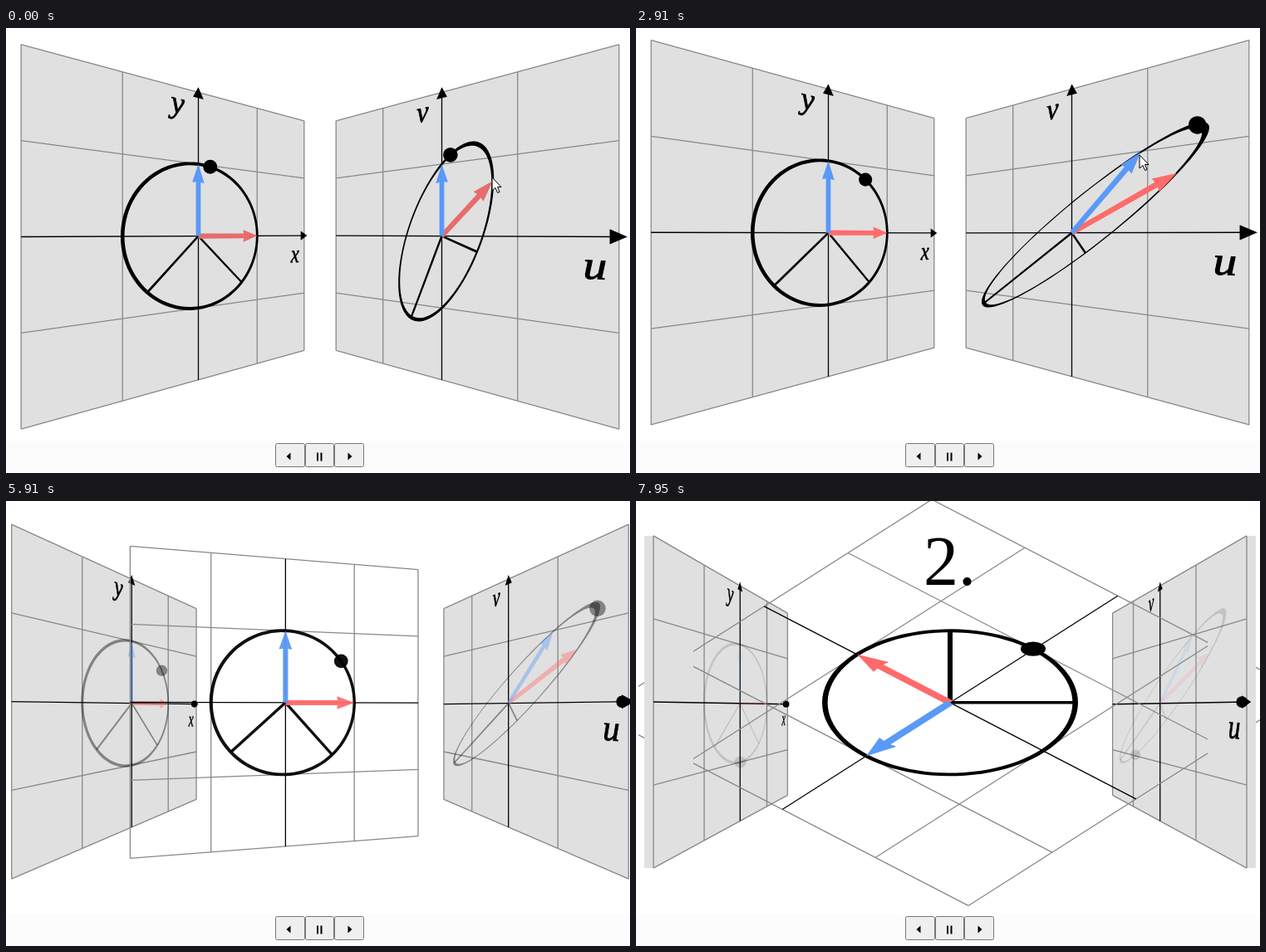
Animation, 751 px wide and 536 px high, one loop 8000 ms. Source, as an HTML page with a canvas:

```html
<!DOCTYPE html>
<html lang="en">
<head>
<meta charset="utf-8">
<title>Matrix decomposition</title>
<style>
html, body { margin: 0; width: 100%; height: 100%; overflow: hidden; background: #fff; }
canvas { display: block; }
</style>
</head>
<body>
<canvas id="stage" width="751" height="536"></canvas>
<script>
const ctx = document.getElementById('stage').getContext('2d');
const LOOP = 8, FOCAL = 485, UNIT = 86.6, VIEW_X = 378, VIEW_Y = 248;
const OPEN = 5.195, SPIN = 6.198, STRETCH = 7.198;
const BLUE = '#5999f8', GRID = '#888', PANEL = '#e0e0e0';

// Each row: time in seconds, then x and y.
const redKeys = [[0, .7, .7], [1.1, 1.32, .69]];
const blueKeys = [[2.1, 0, 1], [2.9, .92, .99]];
const cursorKeys = [
  [0, 585, 180], [1.1, 649, 176], [1.4, 649, 176], [1.89, 530, 196], [2.1, 524, 168],
  [2.9, 606, 153], [3.1, 606, 153], [3.5, 475, 418], [3.88, 333, 515], [4.3, 402, 528],
  [4.7, 421, 519], [5.4, 421, 519], [5.75, 440, 545]
];

const clamp = v => Math.max(0, Math.min(1, v));
const mix = (a, b, k) => a + (b - a) * k;

function track(keys, t) {
  if (t <= keys[0][0]) return keys[0].slice(1);
  for (let i = 1; i < keys.length; i++) {
    const [t0, x0, y0] = keys[i - 1], [t1, x1, y1] = keys[i];
    if (t < t1) {
      const k = (t - t0) / (t1 - t0);
      return [mix(x0, x1, k), mix(y0, y1, k)];
    }
  }
  return keys[keys.length - 1].slice(1);
}

// Perspective projection of a plane turned about its vertical axis.
const plane = (cx, z, angle, drop) => (u, v) => {
  const k = FOCAL / (FOCAL + z + UNIT * u * Math.sin(angle));
  return [VIEW_X + (cx + UNIT * u * Math.cos(angle)) * k, VIEW_Y + (drop - UNIT * v) * k];
};
const linear = (a, b) => (x, y) => [a[0] * x + b[0] * y, a[1] * x + b[1] * y];
const compose = (proj, m) => (x, y) => proj(...m(x, y));

function trace(points) {
  points.forEach((p, i) => i ? ctx.lineTo(...p) : ctx.moveTo(...p));
}

function fill(points, color) {
  ctx.beginPath();
  trace(points);
  ctx.closePath();
  ctx.fillStyle = color;
  ctx.fill();
}

function line(points, color, width) {
  ctx.beginPath();
  trace(points);
  ctx.strokeStyle = color;
  ctx.lineWidth = width;
  ctx.stroke();
}

const circle = (proj, r) => Array.from({ length: 97 }, (_, i) => {
  const a = i / 96 * 2 * Math.PI;
  return proj(r * Math.cos(a), r * Math.sin(a));
});

function ring(proj) {
  ctx.beginPath();
  trace(circle(proj, 1.022));
  trace(circle(proj, .978));
  ctx.fillStyle = '#000';
  ctx.fill('evenodd');
}

// A ball facing the viewer, sized by the depth at its place.
function ball(proj, [u, v], radius, wide, alpha) {
  const [x, y] = proj(u, v), r = y - proj(u, v + radius)[1];
  ctx.globalAlpha = alpha;
  ctx.beginPath();
  ctx.ellipse(x, y, r * wide, r, 0, 0, 2 * Math.PI);
  ctx.fillStyle = '#000';
  ctx.fill();
  ctx.globalAlpha = 1;
}

// Shape points are given along and across the direction of (x, y).
function along(proj, x, y, shape, color) {
  const len = Math.hypot(x, y), c = x / len, s = y / len;
  fill(shape(len).map(([l, w]) => proj(c * l - s * w, s * l + c * w)), color);
}

const arrowShape = len => [
  [0, -.036], [len - .25, -.036], [len - .26, -.092], [len, 0],
  [len - .26, .092], [len - .25, .036], [0, .036]
];
const headShape = len => [[len - .15, -.08], [len, 0], [len - .15, .08]];
const barShape = half => len => [[0, -half], [len, -half], [len, half], [0, half]];

function grid(proj) {
  for (let i = -2; i <= 2; i++) {
    if (!i) continue;
    line([proj(i, -2), proj(i, 2)], GRID, 1.3);
    line([proj(-2, i), proj(2, i)], GRID, 1.3);
  }
  line([proj(0, -2), proj(0, 2)], '#000', 1.3);
  line([proj(-2, 0), proj(2, 0)], '#000', 1.3);
}

function label(proj, text, u, v) {
  const [x, y] = proj(u, v), h = .02;
  const [x1, y1] = proj(u + h, v), [x2, y2] = proj(u, v - h);
  const size = .43 / 100 / h;
  ctx.save();
  ctx.transform((x1 - x) * size, (y1 - y) * size, (x2 - x) * size, (y2 - y) * size, x, y);
  ctx.font = 'italic 100px "Liberation Serif", serif';
  ctx.textAlign = 'center';
  ctx.fillStyle = ctx.strokeStyle = '#000';
  ctx.lineWidth = 2;
  ctx.fillText(text, 0, 22);
  ctx.strokeText(text, 0, 22);
  ctx.restore();
}

function panel(proj, angle, names, edge) {
  const corners = [proj(-2, 2), proj(2, 2), proj(2, -2), proj(-2, -2)];
  fill(corners, PANEL);
  const near = angle > 0 ? -2 : 2;
  const [x, top] = proj(near, 2), bottom = proj(near, -2)[1];
  ctx.fillRect(angle > 0 ? x - edge : x, top, edge, bottom - top);
  grid(proj);
  along(proj, 2.07, 0, headShape, '#000');
  along(proj, 0, 2.07, headShape, '#000');
  const turn = (Math.sin(Math.abs(angle)) - .707) / .293;
  if (turn > 0) ball(proj, [1.92, 0], .07, turn, 1);
  label(proj, names[0], 1.79, -.36);
  label(proj, names[1], -.3, 1.74);
}

// Circle image, singular directions and basis arrows.
function figure(curve, proj, s, bar, red, alpha) {
  ctx.globalAlpha = alpha;
  ring(curve);
  for (const [x, y] of s.axes) along(proj, x, y, barShape(bar), '#000');
  along(proj, ...s.e1, arrowShape, red);
  along(proj, ...s.e2, arrowShape, BLUE);
  ctx.globalAlpha = 1;
}

function buttons(hover) {
  ctx.fillStyle = '#fcfcfc';
  ctx.fillRect(0, 498, 751, 38);
  [324, 360, 395].forEach((x, i) => {
    ctx.beginPath();
    ctx.roundRect(x + .5, 500.5, i === 1 ? 34 : 35, 28, 2);
    ctx.fillStyle = i === hover ? '#e2e2e2' : '#efefef';
    ctx.fill();
    ctx.strokeStyle = '#767676';
    ctx.lineWidth = 1;
    ctx.stroke();
  });
  fill([[337.5, 516], [342.5, 511.5], [342.5, 520.5]], '#000');
  fill([[416.5, 516], [411.5, 511.5], [411.5, 520.5]], '#000');
  ctx.fillRect(374, 511.5, 2, 10);
  ctx.fillRect(378.5, 511.5, 2, 10);
}

function cursor(x, y, beam) {
  if (beam) {
    ctx.fillStyle = '#000';
    ctx.fillRect(x, y - 9, 2, 19);
    return;
  }
  const outline = [[0, 0], [0, 16], [4, 12.5], [6.5, 18.5], [9, 17.5], [6.5, 11.5], [11, 11.5], [0, 0]]
    .map(([dx, dy]) => [x + dx, y + dy]);
  fill(outline, '#fff');
  line(outline, '#000', 1);
}

function middle(p, t, drop, dot, s, red) {
  const spin = clamp(t - SPIN) * (Math.PI - s.angle);
  const wide = 1 + (s.sigma - 1) * clamp(t - STRETCH);
  const alpha = Math.min(1, .08 + 1.2 * p);
  const c = Math.cos(spin), n = Math.sin(spin);
  const base = plane(-146.5 * (1 - p), 0, Math.PI / 4 * (1 - p), drop);
  const turn = linear([wide * c, n], [-wide * n, c]);
  const proj = compose(base, turn);
  ctx.save();
  if (p === 1) {
    // The side panels stand in front of the outer parts.
    ctx.beginPath();
    ctx.rect(69, 0, 619, 498);
    ctx.rect(3, 0, 7, 498);
    ctx.rect(746, 0, 5, 498);
    ctx.clip();
  }
  grid(proj);
  figure(proj, proj, s, .02, red, alpha);
  ball(base, turn(...dot), .1, wide, alpha);
  ctx.restore();
  if (t >= SPIN) {
    ctx.font = '84px "Liberation Serif", serif';
    ctx.fillStyle = '#000';
    ctx.fillText(t < STRETCH ? '1.' : '2.', 346, 101);
  }
}

function draw(t) {
  const p = clamp(t - OPEN);
  const drop = 2.6 - 1.34 * Math.min(t, 5.8);
  const turn = Math.PI / 4 * (1 + p), cx = mix(146.5, 309, p), z = 108 * p;
  const left = plane(-cx, z, turn, drop), right = plane(cx, z, -turn, drop);

  const e1 = track(redKeys, t), e2 = track(blueKeys, t), apply = linear(e1, e2);
  const aa = e1[0] ** 2 + e1[1] ** 2, bb = e2[0] ** 2 + e2[1] ** 2;
  const ab = e1[0] * e2[0] + e1[1] * e2[1];
  const angle = Math.atan2(2 * ab, aa - bb) / 2;
  const sigma = Math.sqrt((aa + bb + Math.hypot(aa - bb, 2 * ab)) / 2);
  const c = Math.cos(angle), n = Math.sin(angle);
  const axes = [[-c, -n], [n, -c]];
  const unit = { e1: [1, 0], e2: [0, 1], axes, angle, sigma };
  const image = { e1, e2, axes: axes.map(v => apply(...v)) };

  const phase = 1.385 + 2 * t;
  const dot = [Math.cos(phase), Math.sin(phase)];
  const red = t < 2.4 ? '#e76c6c' : '#ff6b6b';
  const redRight = t > 1.4 && t < 2.4 ? '#ff9090' : red;
  const faded = Math.min(1, 1.13 - p);
  const edge = 11 * clamp((p - .8) / .2);

  ctx.fillStyle = '#fff';
  ctx.fillRect(0, 0, 751, 536);
  panel(left, turn, 'xy', edge);
  panel(right, -turn, 'uv', edge);
  figure(left, left, unit, .015, red, faded);
  ball(left, dot, .1, 1, faded);
  figure(compose(right, apply), right, image, .015, redRight, faded);
  ball(right, apply(...dot), .1, 1, faded);
  if (p > 0) middle(p, t, drop, dot, unit, red);

  const [mx, my] = track(cursorKeys, t);
  const overNext = mx >= 395 && mx < 431 && my > 500 && my < 529;
  buttons(overNext ? 2 : -1);
  cursor(mx, my, t > 3.8 && t < 3.98);
}

const start = performance.now();
function tick() {
  draw((performance.now() - start) / 1000 % LOOP);
  requestAnimationFrame(tick);
}
tick();
</script>
</body>
</html>
```
